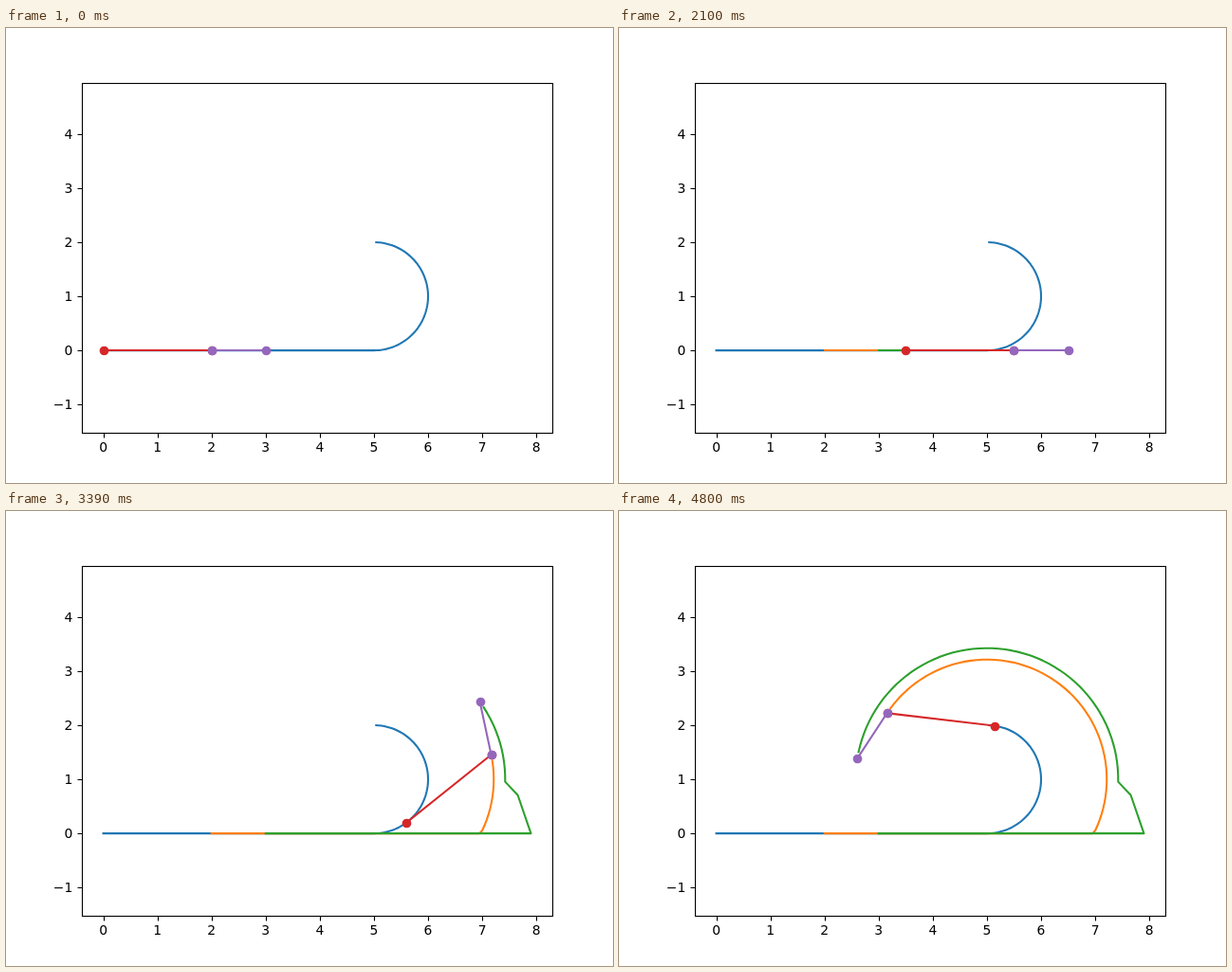
These frames come from a looping animation (640x480 px, 4.83 s). An HTML page with a canvas:

```html
<!DOCTYPE html>
<html lang="en">
<head>
<meta charset="utf-8">
<style>
  html, body { margin: 0; width: 100%; height: 100%; overflow: hidden; background: #fff; }
  canvas { display: block; }
</style>
</head>
<body>
<canvas id="stage" width="640" height="480"></canvas>
<script>
const ctx = document.getElementById('stage').getContext('2d');
const FRAMES = 161, FRAME_MS = 30, STEP = 0.05;
const WHEELBASE = 2, FRONT = 1, SCALE = 57.077;
const BLUE = '#1f77b4', ORANGE = '#ff7f0e', GREEN = '#2ca02c', RED = '#d62728', PURPLE = '#9467bd';

const px = x => 102.55 + x * SCALE;
const py = y => 340.14 - y * SCALE;
const range = n => Array.from({ length: n }, (_, i) => i);
const ahead = ([x, y], angle, length) => [x + length * Math.cos(angle), y + length * Math.sin(angle)];

// Track: five units straight, then a unit-radius left turn.
function track(i) {
  const arc = i * STEP - 5;
  return arc <= 0 ? [i * STEP, 0] : [5 + Math.sin(arc), 1 - Math.cos(arc)];
}

function heading(i) {
  const [x0, y0] = track(i), [x1, y1] = track(i + 1);
  return Math.atan2(y1 - y0, x1 - x0);
}

// Bicycle model: the steering angle follows from the track's curvature.
function pose(i) {
  const angle = heading(i);
  const curvature = (heading(i + 1) - angle) / STEP;
  const rear = track(i);
  const hinge = ahead(rear, angle, WHEELBASE);
  const tip = ahead(hinge, angle + Math.atan(WHEELBASE * curvature), FRONT);
  return { rear, hinge, tip };
}

const route = range(163).map(track);
const poses = range(FRAMES).map(pose);

function line(points, color) {
  const flat = points.every(p => Math.abs(p[1]) < 1e-9);
  const snap = flat ? Math.round : v => v;
  ctx.strokeStyle = color;
  ctx.lineWidth = 2.083;
  ctx.lineCap = 'square';
  ctx.lineJoin = 'round';
  ctx.beginPath();
  for (const [x, y] of points) ctx.lineTo(snap(px(x)), snap(py(y)));
  ctx.stroke();
}

function dot([x, y], color) {
  ctx.fillStyle = color;
  ctx.beginPath();
  ctx.arc(Math.round(px(x)) + 0.5, Math.round(py(y)) + 0.5, 4.86, 0, 2 * Math.PI);
  ctx.fill();
}

function link(a, b, color) {
  line([a, b], color);
  dot(a, color);
  dot(b, color);
}

function axes() {
  ctx.strokeStyle = ctx.fillStyle = '#000';
  ctx.lineWidth = 1.11;
  ctx.lineCap = 'butt';
  ctx.lineJoin = 'miter';
  ctx.font = '13.89px "DejaVu Sans", sans-serif';
  ctx.strokeRect(80.5, 58.5, 496, 369);
  ctx.beginPath();
  ctx.textAlign = 'center';
  for (let v = 0; v <= 8; v++) {
    const x = Math.round(px(v)) + 0.5;
    ctx.moveTo(x, 427.5);
    ctx.lineTo(x, 432.5);
    ctx.fillText(v, px(v), 447);
  }
  ctx.textAlign = 'right';
  for (let v = -1; v <= 4; v++) {
    const y = Math.round(py(v)) + 0.5;
    ctx.moveTo(80.5, y);
    ctx.lineTo(75.5, y);
    ctx.fillText(String(v).replace('-', '\u2212'), 70.3, Math.round(py(v)) + 5);
  }
  ctx.stroke();
}

function draw() {
  const i = Math.floor(performance.now() / FRAME_MS) % FRAMES;
  const past = poses.slice(0, i), { rear, hinge, tip } = poses[i];
  ctx.fillStyle = '#fff';
  ctx.fillRect(0, 0, 640, 480);
  line(route, BLUE);
  line(past.map(p => p.hinge), ORANGE);
  line(past.map(p => p.tip), GREEN);
  link(rear, hinge, RED);
  link(hinge, tip, PURPLE);
  axes();
  requestAnimationFrame(draw);
}
draw();
</script>
</body>
</html>
```
